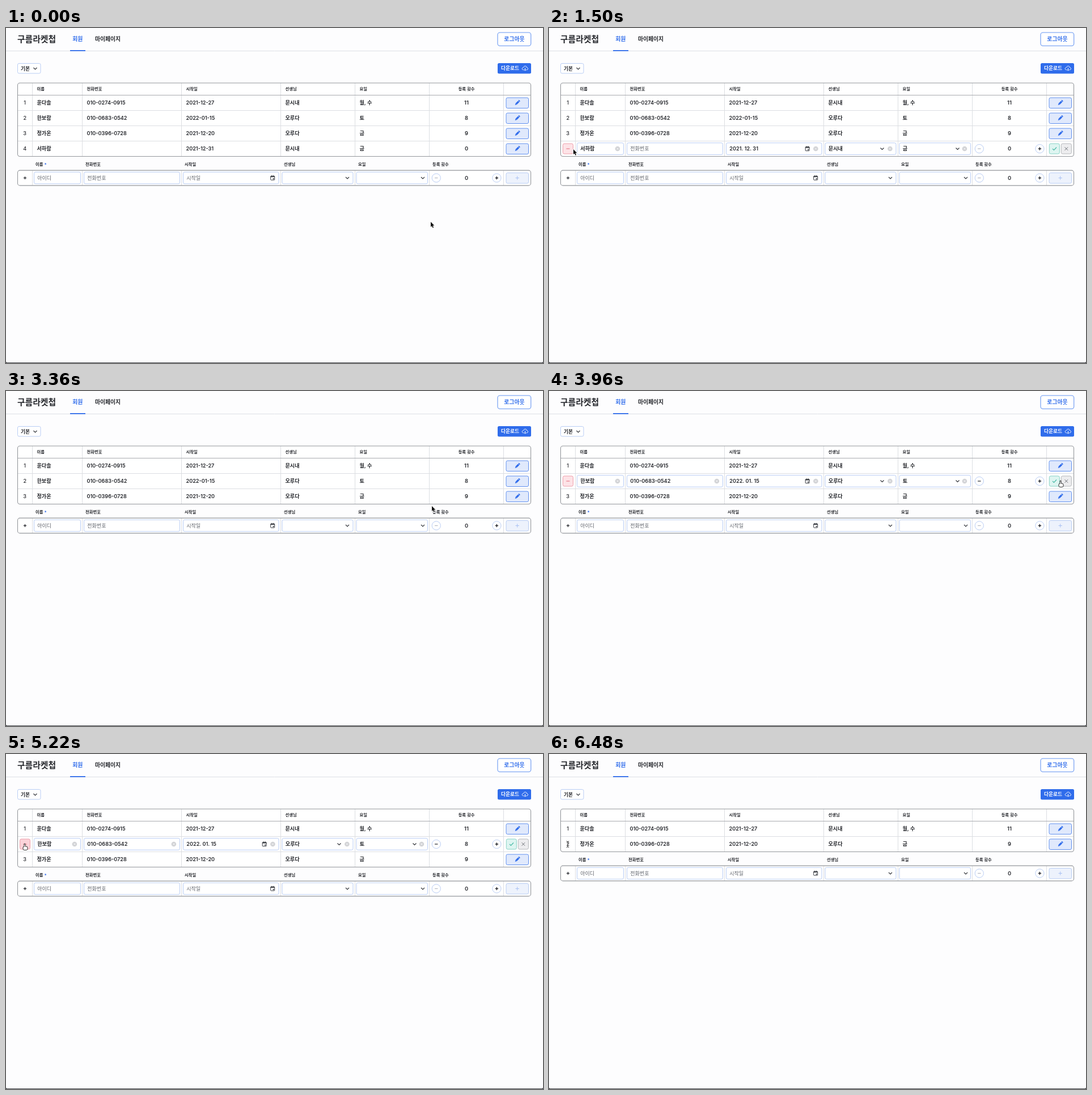
An HTML page with a canvas for the animation above (6.81 s loop, 947x591 px).

```html
<!DOCTYPE html>
<html lang="ko">
<head>
<meta charset="utf-8">
<style>
html, body { margin: 0; width: 100%; height: 100%; overflow: hidden; background: #fdfdfe; }
canvas { display: block; }
</style>
</head>
<body>
<canvas id="stage" width="947" height="591"></canvas>
<script>
const ctx = document.getElementById('stage').getContext('2d');
const LOOP = 6810, STEP = 30;
const FONT = 'Inter, "Noto Sans CJK KR", "Noto Sans CJK", sans-serif';
const INK = '#25272c', BLUE = '#2f6ceb', PALE = '#b9cdf4', GRID = '#dcdee2', EDGE = '#94979c';
const TOP = 97, BODY = 118.5, ROW = 27;
const COLS = [46.5, 134.5, 309.5, 484.5, 615.5, 746.5, 877.5];
const LABELS = ['이름', '전화번호', '시작일', '선생님', '요일'];
const FIELDS = [[49.5, 131.5], [137.5, 306.5], [312.5, 481], [487, 612], [618, 743.5]];
const MEMBERS = [
  ['윤다솔', '010-0274-0915', '2021-12-27', '문시내', '월, 수', 11],
  ['한보람', '010-0683-0542', '2022-01-15', '오루다', '토', 8],
  ['정가온', '010-0396-0728', '2021-12-20', '오루다', '금', 9],
  ['서하람', '', '2021-12-31', '문시내', '금', 0]
];
const EDIT_LAST = 720, DROP_LAST = 2070, EDIT_SECOND = 3960, DROP_SECOND = 5460;

// Pointer path: time, x, y
const PATH = [
  [0, 749, 342], [30, 763, 337], [180, 763, 337], [480, 902, 212], [750, 902, 212],
  [1080, 470, 229], [1380, 80, 219], [1500, 43, 214], [1680, 34, 213], [2100, 34, 213],
  [2280, 88, 212], [2670, 88, 212], [2700, 99, 212], [2880, 430, 218], [3090, 735, 207],
  [3300, 735, 207], [3360, 751, 203], [3720, 902, 159], [3990, 902, 159], [4230, 470, 176],
  [4470, 132, 171], [4560, 132, 171], [4830, 33, 159], [LOOP, 33, 159]
];

function text(s, x, y, size = 9.1, color = INK, weight = 600, align = 'left') {
  ctx.font = `${weight} ${size}px ${FONT}`;
  ctx.fillStyle = color;
  ctx.textAlign = align;
  ctx.fillText(s, x, y + size * 0.36);
}

function line(points, color, width = 1) {
  ctx.beginPath();
  points.forEach(([x, y], i) => i ? ctx.lineTo(x, y) : ctx.moveTo(x, y));
  ctx.strokeStyle = color;
  ctx.lineWidth = width;
  ctx.stroke();
}

function box(x, y, w, h, radius, fill, stroke, width = 1) {
  ctx.beginPath();
  ctx.roundRect(x, y, w, h, radius);
  if (fill) { ctx.fillStyle = fill; ctx.fill(); }
  if (stroke) { ctx.strokeStyle = stroke; ctx.lineWidth = width; ctx.stroke(); }
}

function circle(x, y, r, fill, stroke) {
  box(x - r, y - r, 2 * r, 2 * r, r, fill, stroke);
}

function minus(x, y, r, color, width = 1.2) {
  line([[x - r, y], [x + r, y]], color, width);
}

function plus(x, y, r, color, width = 1.2) {
  minus(x, y, r, color, width);
  line([[x, y - r], [x, y + r]], color, width);
}

function cross(x, y, r, color, width = 1) {
  line([[x - r, y - r], [x + r, y + r]], color, width);
  line([[x + r, y - r], [x - r, y + r]], color, width);
}

function chevron(x, y) {
  line([[x - 3, y - 1.5], [x, y + 1.5], [x + 3, y - 1.5]], '#35383e', 1.2);
}

function calendar(x, y) {
  box(x - 3.5, y - 3.3, 7, 7, 0.8, null, '#3c3f45', 1);
  line([[x - 3.5, y - 2.3], [x + 3.5, y - 2.3]], '#3c3f45', 1.8);
  ctx.fillStyle = '#3c3f45';
  ctx.fillRect(x - 2, y - 4.7, 1, 1.5);
  ctx.fillRect(x + 1, y - 4.7, 1, 1.5);
  ctx.fillRect(x + 0.4, y + 0.6, 2, 2);
}

function clearIcon(x, y) {
  circle(x, y, 4.3, '#d2d3d6');
  cross(x, y, 1.6, '#f8f8f9', 0.9);
}

function pencil(x, y) {
  ctx.save();
  ctx.translate(x, y);
  ctx.rotate(Math.PI / 4);
  ctx.fillStyle = BLUE;
  ctx.fillRect(-1.6, -5.7, 3.2, 1.7);
  ctx.fillRect(-1.6, -3.4, 3.2, 6.1);
  ctx.beginPath();
  ctx.moveTo(-1.6, 2.7);
  ctx.lineTo(1.6, 2.7);
  ctx.lineTo(0, 5.6);
  ctx.fill();
  ctx.restore();
}

function cloud(x, y) {
  ctx.beginPath();
  ctx.moveTo(x - 2, y + 3);
  ctx.bezierCurveTo(x - 7, y + 3, x - 5.5, y - 1.8, x - 3, y - 1.3);
  ctx.bezierCurveTo(x - 2, y - 5, x + 3, y - 4.4, x + 3, y - 1);
  ctx.bezierCurveTo(x + 6.2, y - 0.8, x + 5.5, y + 3, x + 2, y + 3);
  ctx.strokeStyle = '#fff';
  ctx.lineWidth = 0.9;
  ctx.stroke();
  line([[x, y - 0.8], [x, y + 4]], '#fff', 0.9);
  line([[x - 1.6, y + 2.5], [x, y + 4.1], [x + 1.6, y + 2.5]], '#fff', 0.9);
}

function header() {
  ctx.fillStyle = '#fdfdfe';
  ctx.fillRect(0, 0, 947, 591);
  line([[0, 40.5], [947, 40.5]], '#dee1e6');
  text('구름라켓첩', 20, 19.3, 14.8, INK, 600);
  text('회원', 126.3, 19.5, 9.8, BLUE, 600, 'center');
  text('마이페이지', 179.5, 19.5, 9.8, INK, 600, 'center');
  ctx.fillStyle = BLUE;
  ctx.fillRect(113, 39, 27, 1.8);
  box(867, 8, 58.7, 23.5, 4, '#fff', '#6796f1', 1.1);
  text('로그아웃', 896.4, 19.5, 9.8, BLUE, 600, 'center');
  box(20.5, 62.5, 40.5, 17.5, 2.5, '#fff', PALE);
  text('기본', 26, 71.5, 8.7);
  chevron(51.5, 71.5);
  box(867, 62, 59, 18.5, 2.5, BLUE);
  text('다운로드', 873, 71.3, 8.7, '#fff');
  cloud(915.5, 71);
}

function frame(y, h) {
  box(20.5, y, 905, h, 4, null, EDGE, 1.1);
}

function counter(y, count) {
  const off = count === 0;
  circle(758.8, y, 7.6, '#fff', PALE);
  minus(758.8, y, 2.7, off ? '#b4b9c3' : INK);
  text(count, 812, y, 9.4, INK, 600, 'center');
  circle(865.4, y, 7.6, '#fff', PALE);
  plus(865.4, y, 2.7, INK, 1.4);
}

function inputs(y, values) {
  const hints = ['아이디', '전화번호', '시작일', '', ''];
  FIELDS.forEach(([left, right], i) => {
    const value = values ? values[i] : '';
    box(left, y - 10.3, right - left, 20.6, 2.5, '#fff', PALE);
    if (value) {
      text(i === 2 ? value.replace(/-/g, '. ') : value, left + 5.8, y);
      clearIcon(right - 10.6, y);
    } else if (hints[i]) {
      text(hints[i], left + 5.8, y, 9, '#5f636b', 500);
    }
    const iconX = right - (value ? 25 : 10.5);
    if (i === 2) calendar(iconX - 0.3, y);
    if (i > 2) chevron(iconX + (i === 4 ? 2 : 0.5), y);
  });
}

function inside(p, x, y, w, h) {
  return p.x >= x && p.x <= x + w && p.y >= y && p.y <= y + h;
}

function editButton(y, pointer) {
  const hover = inside(pointer, 882, y - 9, 39.5, 18.5);
  box(882, y - 9, 39.5, 18.5, 2.5, hover ? '#cfdefb' : '#e0e9fc', '#6291ef');
  pencil(901.7, y);
}

function plainRow(member, number, y, pointer) {
  text(number, 33.2, y, 9.1, INK, 500, 'center');
  member.slice(0, 5).forEach((value, i) => text(value, COLS[i] + 8, y));
  text(member[5], 812, y, 9.4, INK, 600, 'center');
  editButton(y, pointer);
}

function editRow(member, y, pointer) {
  const hover = inside(pointer, 24.5, y - 9, 18, 18);
  box(24.5, y - 9, 18, 18, 2.5, hover ? '#fbd3d9' : '#fde3e7', '#eea0ac');
  minus(33.5, y, 3, '#e4687a', 1);
  inputs(y, member);
  counter(y, member[5]);
  box(882.3, y - 9, 18, 18, 2.5, '#def5f1', '#87d3c6');
  line([[888, y], [890.4, y + 2.4], [895, y - 2.5]], '#43b8a3', 1.1);
  box(903.3, y - 9, 18, 18, 2.5, '#ededef', '#b5b7bb');
  cross(912.3, y, 2.8, '#6f7379');
}

function table(members, editing, pointer) {
  const bottom = BODY + members.length * ROW;
  box(20.5, TOP, 905, bottom - TOP, 4, '#fff');
  COLS.forEach(x => line([[x, TOP], [x, bottom]], GRID));
  members.forEach((m, i) => {
    if (i) line([[20, BODY + i * ROW], [926, BODY + i * ROW]], GRID);
  });
  line([[20, BODY], [926, BODY]], '#a9abb0');
  frame(TOP, bottom - TOP);
  LABELS.forEach((label, i) => text(label, COLS[i] + 8, 107.3, 7.3));
  text('등록 횟수', 812, 107.3, 7.3, INK, 600, 'center');
  members.forEach((member, i) => {
    const y = BODY + (i + 0.5) * ROW;
    if (i === editing) editRow(member, y, pointer);
    else plainRow(member, i + 1, y, pointer);
  });
  return bottom;
}

function form(bottom) {
  const y = bottom + 38;
  [...LABELS, '등록 횟수'].forEach((label, i) => text(label, COLS[i] + 5.5, bottom + 14.3, 7.3));
  text('*', 67.5, bottom + 14.8, 8, BLUE);
  box(20.5, y - 13.4, 905, 26.8, 4, '#fff');
  [COLS[0], ...COLS.slice(1)].forEach(x => line([[x, y - 13.4], [x, y + 13.4]], GRID));
  frame(y - 13.4, 26.8);
  plus(33.5, y, 2.6, INK, 1.2);
  inputs(y);
  counter(y, 0);
  box(882, y - 9, 39.5, 18.5, 2.5, '#edf2fc', PALE);
  plus(901.7, y, 3.2, '#a9c1f3', 1);
}

function pointerAt(t) {
  const next = Math.max(1, PATH.findIndex(p => p[0] > t));
  const [t0, x0, y0] = PATH[next - 1], [t1, x1, y1] = PATH[next];
  const k = (t - t0) / (t1 - t0);
  const ease = k * k * (3 - 2 * k);
  return { x: x0 + (x1 - x0) * ease, y: y0 + (y1 - y0) * ease };
}

function outlined(points, x, y) {
  ctx.beginPath();
  points.forEach(([px, py]) => ctx.lineTo(x + px, y + py));
  ctx.closePath();
  ctx.lineJoin = 'round';
  ctx.strokeStyle = '#fff';
  ctx.lineWidth = 1.6;
  ctx.stroke();
  ctx.fillStyle = '#111';
  ctx.fill();
  ctx.lineJoin = 'miter';
}

function arrow({ x, y }) {
  outlined([[0, 0], [0, 9], [2, 7.2], [3.5, 10.6], [5.1, 9.9], [3.6, 6.6], [6.4, 6.6]], x, y);
}

function hand({ x, y }) {
  box(x - 1, y - 1, 2, 8, 1, '#fff', '#111', 0.9);
  box(x - 3, y + 4, 8, 6.5, 2.3, '#fff', '#111', 0.9);
  ctx.fillStyle = '#fff';
  ctx.fillRect(x - 0.5, y + 2, 1, 5);
}

function beam({ x, y }) {
  const parts = [
    [[x, y - 4], [x, y + 4.5]],
    [[x - 2.2, y - 5.3], [x, y - 4], [x + 2.2, y - 5.3]],
    [[x - 2.2, y + 5.8], [x, y + 4.5], [x + 2.2, y + 5.8]],
    [[x - 1.3, y + 2], [x + 1.3, y + 2]]
  ];
  parts.forEach(p => line(p, '#fff', 2.2));
  parts.forEach(p => line(p, '#222', 1));
}

function bottomEdge() {
  ctx.fillStyle = '#4b4c50';
  ctx.fillRect(0, 590, 947, 1);
  ctx.fillRect(0, 589, 1, 1);
  ctx.fillRect(946, 589, 1, 1);
}

function draw(now) {
  const t = Math.floor((now % LOOP) / STEP) * STEP;
  const pointer = pointerAt(t);
  const members = MEMBERS.filter((m, i) =>
    !(i === 3 && t >= DROP_LAST) && !(i === 1 && t >= DROP_SECOND));
  let editing = -1;
  if (t >= EDIT_LAST && t < DROP_LAST) editing = 3;
  if (t >= EDIT_SECOND && t < DROP_SECOND) editing = 1;

  header();
  form(table(members, editing, pointer));
  bottomEdge();

  const rowY = BODY + (editing + 0.5) * ROW;
  const onDelete = editing >= 0 && inside(pointer, 24.5, rowY - 9, 18, 18);
  const onRight = pointer.x > 882 && pointer.y < BODY + members.length * ROW;
  if (t > DROP_SECOND) beam(pointer);
  else if (onDelete || onRight) hand(pointer);
  else arrow(pointer);
}

const start = performance.now();
function tick() {
  draw(performance.now() - start);
  requestAnimationFrame(tick);
}
draw(0);
requestAnimationFrame(tick);
</script>
</body>
</html>
```
